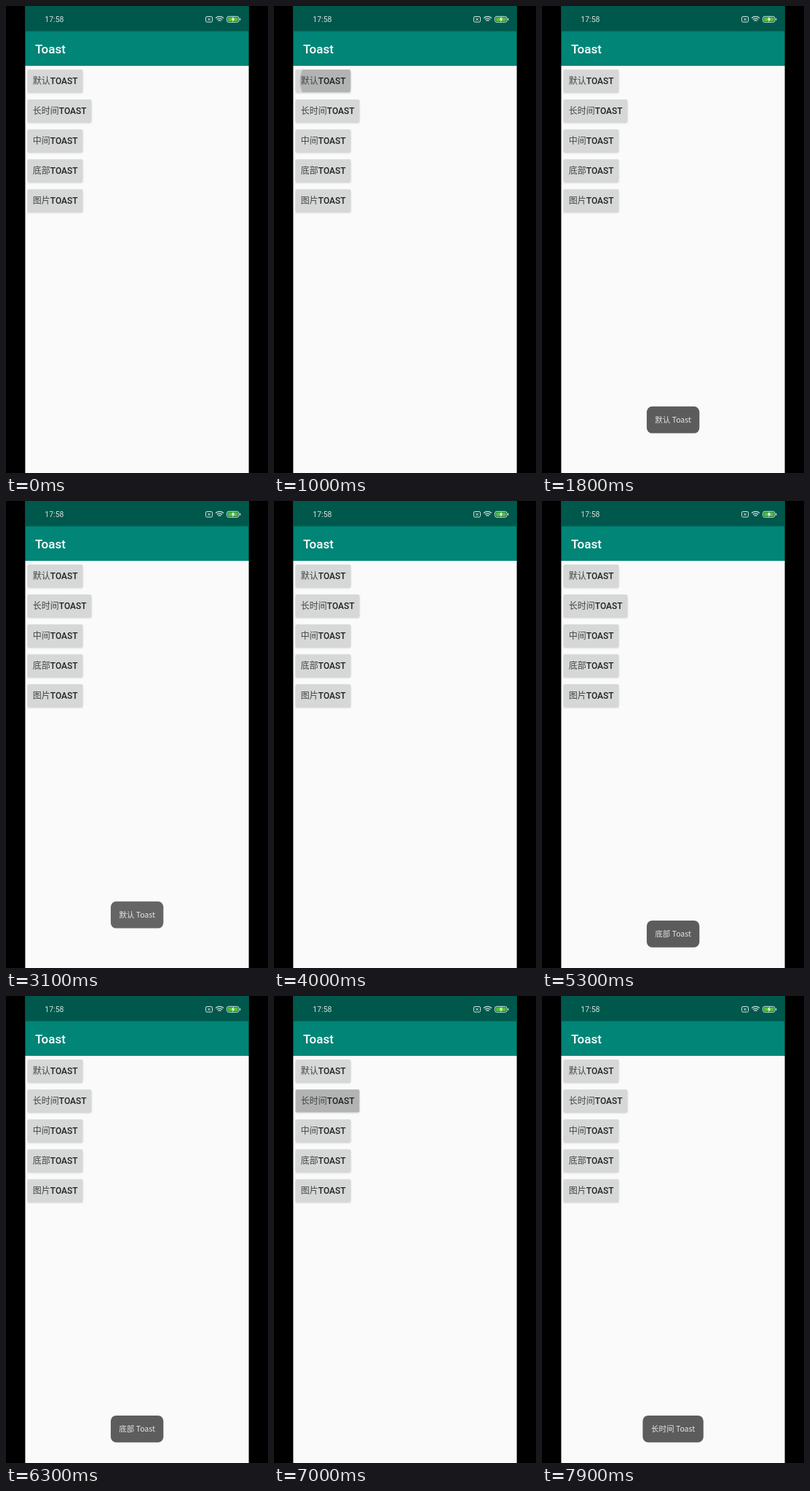
Write an HTML page that moves like this. It is 360 px wide and 640 px high and loops after 8000 ms.

```html
<!DOCTYPE html>
<html lang="zh">
<head>
<meta charset="utf-8">
<title>Toast</title>
<style>
html, body { margin: 0; width: 100%; height: 100%; overflow: hidden; background: #000; }
svg { display: block; width: 360px; height: 640px; }
text { font-family: Roboto, "Noto Sans CJK SC", "Noto Sans CJK", sans-serif; }
.cjk, .toast text { font-family: "Noto Sans CJK SC", "Noto Sans CJK", sans-serif; font-weight: 300; }
.label { font-size: 12px; fill: #222; }
.label.cjk { fill: #444; }
.caps { font-weight: 500; }
.toast text { font-size: 10.5px; fill: #e6e6e6; text-anchor: middle; }
</style>
</head>
<body>
<svg viewBox="0 0 360 640">
  <defs>
    <filter id="soft" x="-10%" y="-20%" width="120%" height="150%">
      <feGaussianBlur stdDeviation="1"/>
    </filter>
  </defs>
  <rect width="360" height="640" fill="#000"/>
  <rect x="26.4" y="82" width="307.2" height="558" fill="#fafafa"/>
  <rect x="26.4" width="307.2" height="82" fill="#008577"/>
  <rect x="26.4" width="307.2" height="34.5" fill="#00574b"/>
  <text x="53.3" y="22" font-size="10.5" fill="#d3e2df">17:58</text>
  <text x="40" y="65" font-size="17" font-weight="500" fill="#fff">Toast</text>

  <g fill="none" stroke="#d3e2df">
    <rect x="274.5" y="14.5" width="9" height="7.5" rx="1.6"/>
    <path d="M277.3 16.6l3.4 3.4m0-3.4l-3.4 3.4"/>
    <path d="M288 16.6q5.5-4.6 11 0M289.8 18.6q3.7-3 7.4 0M291.5 20.5q2-1.6 4 0" stroke-width="1.3"/>
    <rect x="303.5" y="14.3" width="16.5" height="8" rx="2.6"/>
    <path d="M321.7 16.8v3" stroke-width="1.2"/>
  </g>
  <rect x="304.8" y="15.6" width="13.9" height="5.4" rx="1.4" fill="#4fc13a"/>
  <path d="M312.8 14.2l-3 4.6h2l-.8 3.6 3.2-4.8h-2z" fill="#fff"/>

  <g id="buttons"></g>
  <g id="toasts"></g>
</svg>
<script>
const LOOP = 8000, STEP = 100;
const STAY = { short: 1980, long: 3500 };
const labels = ["默认", "长时间", "中间", "底部", "图片"];
const taps = [
  { button: 0, press: 860, touch: 95, show: 1060, top: 548.8, width: 72.4, stay: STAY.short },
  { button: 3, press: 4060, touch: 90, show: 4300, top: 574.9, width: 72.4, stay: STAY.short },
  { button: 1, press: 6740, touch: 95, show: 7040, top: 574.9, width: 83.4, stay: STAY.long }
];

const make = (tag, attrs, parent, text) => {
  const el = document.createElementNS("http://www.w3.org/2000/svg", tag);
  for (const key in attrs) el.setAttribute(key, attrs[key]);
  if (text) el.textContent = text;
  return parent.appendChild(el);
};
const clamp = v => Math.min(1, Math.max(0, v));
const easeOut = v => 1 - (1 - v) ** 2;
const mix = (a, b, p) => a + (b - a) * p;

const buttons = labels.map((label, i) => {
  const g = make("g", {}, document.getElementById("buttons"));
  const y = 87.2 + 41 * i, width = 51.6 + 12 * label.length;
  const box = { x: 29.7, y, width, height: 31, rx: 1.6 };
  make("rect", { ...box, y: y + 1, fill: "#999", opacity: .5, filter: "url(#soft)" }, g);
  make("rect", { ...box, fill: "#d6d7d7" }, g);
  const clip = make("clipPath", { id: "clip" + i }, g);
  make("rect", box, clip);
  const layer = make("g", { "clip-path": `url(#clip${i})` }, g);
  const ripple = make("circle", { cy: y + 15.5, fill: "#b2b3b3", opacity: 0 }, layer);
  make("text", { class: "label cjk", x: 36.8, y: y + 20.2 }, g, label);
  make("text", { class: "label caps", x: 36.8 + 12 * label.length, y: y + 20.2 }, g, "TOAST");
  return { ripple, center: 29.7 + width / 2, radius: Math.hypot(width, 31) / 2 + 1 };
});

for (const tap of taps) {
  const { top, width } = tap;
  tap.toast = make("g", { class: "toast", opacity: 0 }, document.getElementById("toasts"));
  make("rect", { x: 180.1 - width / 2, y: top, width, height: 36.8, rx: 7.5, fill: "#5c5c5c" }, tap.toast);
  make("text", { x: 180.1, y: top + 22.4 }, tap.toast, labels[tap.button] + " Toast");
}

function render(t) {
  for (const tap of taps) {
    const { ripple, center, radius } = buttons[tap.button];
    const age = t - tap.press;
    const grow = easeOut(clamp(age / 225));
    ripple.setAttribute("cx", mix(tap.touch, center, grow));
    ripple.setAttribute("r", radius * grow);
    ripple.setAttribute("opacity", age < 0 ? 0 : 1 - clamp((age - 260) / 300));

    // toasts fade in place
    const shown = t - tap.show;
    const enter = easeOut(clamp(shown / 300));
    const leave = clamp((shown - tap.stay) / 250) ** 2;
    tap.toast.setAttribute("opacity", enter * (1 - leave));
  }
}

function tick() {
  const t = performance.now() % LOOP;
  render(Math.floor(t / STEP) * STEP);
  requestAnimationFrame(tick);
}
tick();
</script>
</body>
</html>
```
